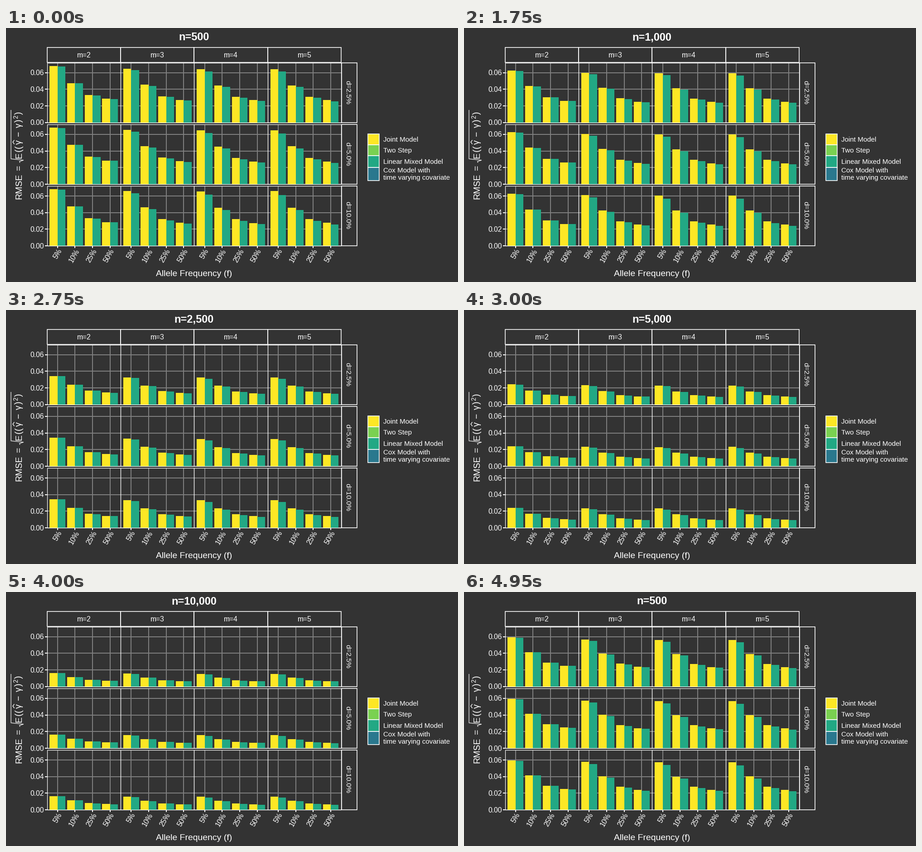
A matplotlib script that plays this animation: 998x561 px, repeating every 5000 ms.

```python
import numpy as np
import matplotlib
import matplotlib.pyplot as plt
from matplotlib.animation import FuncAnimation
from matplotlib.patches import Rectangle

matplotlib.rcParams["font.family"] = "Liberation Sans"

W, H, DPI = 998, 561, 64
PX = 72 / DPI  # points per pixel
BG, GRID, FG = "#333333", "#7f7f7f", "white"
YELLOW, LIME, GREEN, BLUE = "#fde725", "#7ad151", "#22a884", "#2a788e"

SIZES = ["500", "1,000", "2,500", "5,000", "10,000"]
FREQS = ["5%", "10%", "25%", "50%"]
DROPOUT = ["2.5", "5.0", "10.0"]
HOLD, MOVE = 15, 5
STEP = HOLD + MOVE

# Panel layout in pixels
LEFT, COL, TOP, ROW, PANEL_H = 90.6, 162.4, 77, 136.1, 131.8
UNIT = 1835
CAT = COL / 4.2
BAR = 0.45 * CAT


def rmse_table():
    """RMSE with axes size, d, m, frequency, model."""
    by_size = np.array([0.0674, 0.0674, 0.0361, 0.0240, 0.0162])
    by_freq = np.array([1, 0.7, 0.487, 0.42])
    n, d, m, f = np.ogrid[:5, :3, :4, :4]
    linear = by_size[n] * by_freq[f] * (0.905 + 0.095 * np.exp(-1.1 * m))
    # the joint model loses accuracy with more visits and more dropout
    joint = linear * (1.007 + 0.022 * np.sqrt(m * (d + 1)))
    return np.stack(np.broadcast_arrays(joint, linear), axis=-1)


RMSE = rmse_table()

fig = plt.figure(figsize=(W / DPI, H / DPI), dpi=DPI, facecolor=BG)
ax = fig.add_axes([0, 0, 1, 1])
ax.set_xlim(0, W)
ax.set_ylim(H, 0)
ax.axis("off")


def line(xs, ys, color=FG, width=1.3, z=1):
    ax.plot(xs, ys, color=color, lw=width * PX, zorder=z, solid_capstyle="butt")


def box(x, y, w, h, fill="none", edge=FG, width=1.2, z=4):
    patch = Rectangle((x, y), w, h, fc=fill, ec=edge, lw=width * PX, zorder=z)
    return ax.add_patch(patch)


def label(x, y, s, size=15.65, ha="center", rot=0, **kw):
    return ax.text(x, y, s, size=size * PX, color=FG, ha=ha, va="baseline",
                   rotation=rot, rotation_mode="anchor", zorder=6, **kw)


def cat_x(col, k):
    return LEFT + col * COL + (0.6 + k) * CAT


def draw_panel(row, col):
    x, y = LEFT + col * COL, TOP + row * ROW
    base = y + PANEL_H
    for k in range(4):
        line([cat_x(col, k)] * 2, [y, base], GRID, 2)
        line([x, x + COL], [base - 0.02 * k * UNIT] * 2, GRID, 2)
    box(x, y, COL, PANEL_H)


def draw_facets():
    for row, col in np.ndindex(3, 4):
        draw_panel(row, col)
    for col in range(4):
        x = LEFT + col * COL
        box(x, 43, COL, 33.3, width=1.6)
        label(x + COL / 2, 64.6, f"m={col + 2}")
        for k, freq in enumerate(FREQS):
            cx = cat_x(col, k)
            line([cx, cx], [481, 486], width=2)
            label(cx + 9.5, 492, freq, ha="right", rot=60)
    for row, d in enumerate(DROPOUT):
        y = TOP + row * ROW
        box(LEFT + 4 * COL + 0.5, y, 33.9, PANEL_H, width=1.6)
        label(750.2, y + PANEL_H / 2 - 1, f"d={d}%", 15.4, rot=270)
        for k in range(4):
            ty = y + PANEL_H - 0.02 * k * UNIT
            line([86, LEFT], [ty, ty], width=2)
            label(83.5, ty + 5.6, f"{0.02 * k:.2f}", ha="right")


def draw_axis_titles():
    label(415.5, 547.8, "Allele Frequency (f)", 19.4)
    parts = [(378, "RMSE"), (314, "="), (287.5, "E"), (273, "("), (266, "("),
             (257, "γ"), (238.5, "−"), (220, "γ"), (208, ")"), (191, ")")]
    for y, s in parts:
        label(34, y, s, 19.5, ha="left", rot=90)
    label(26.5, 200, "2", 13.7, ha="left", rot=90)
    line([18.5, 15, 18.5], [256.5, 252, 247.5], width=1.4)
    line([31, 29.5, 38.5, 11, 11], [297.5, 295, 292, 289, 181], width=1.2)


def draw_legend():
    keys = [(234, 24.2, YELLOW), (258.2, 24.2, LIME),
            (282.4, 25.2, GREEN), (307.6, 29, BLUE)]
    for y, h, color in keys:
        box(799.5, y, 24.3, h, color, width=1.6)
    names = [(251.3, "Joint Model"), (275.4, "Two Step"), (299.6, "Linear Mixed Model"),
             (318.6, "Cox Model with"), (335, "time varying covariate")]
    for y, s in names:
        label(833, y, s, 15.1, ha="left")


def make_bars():
    bars = []
    for row, col, k, model in np.ndindex(RMSE.shape[1:]):
        x = cat_x(col, k) + (model - 1) * BAR
        y = TOP + row * ROW + PANEL_H
        color = (YELLOW, GREEN)[model]
        bars.append(box(x, y, BAR, 0, color, "none", 0, 3))
    return bars


draw_facets()
draw_axis_titles()
draw_legend()
bars = make_bars()
title = label(415.3, 27, "", 23.5, weight="bold")


def update(i):
    state, t = divmod(i, STEP)
    after = (state + 1) % len(SIZES)
    p = max(0, t - HOLD + 1) / (MOVE + 1)
    values = (1 - p) * RMSE[state] + p * RMSE[after]
    for bar, v in zip(bars, values.flat):
        bar.set_height(-v * UNIT)
    title.set_text("n=" + SIZES[after if p >= 0.5 else state])
    return bars + [title]


anim = FuncAnimation(fig, update, frames=STEP * len(SIZES), interval=50,
                     repeat=True, repeat_delay=0, blit=False)
plt.show()
```
